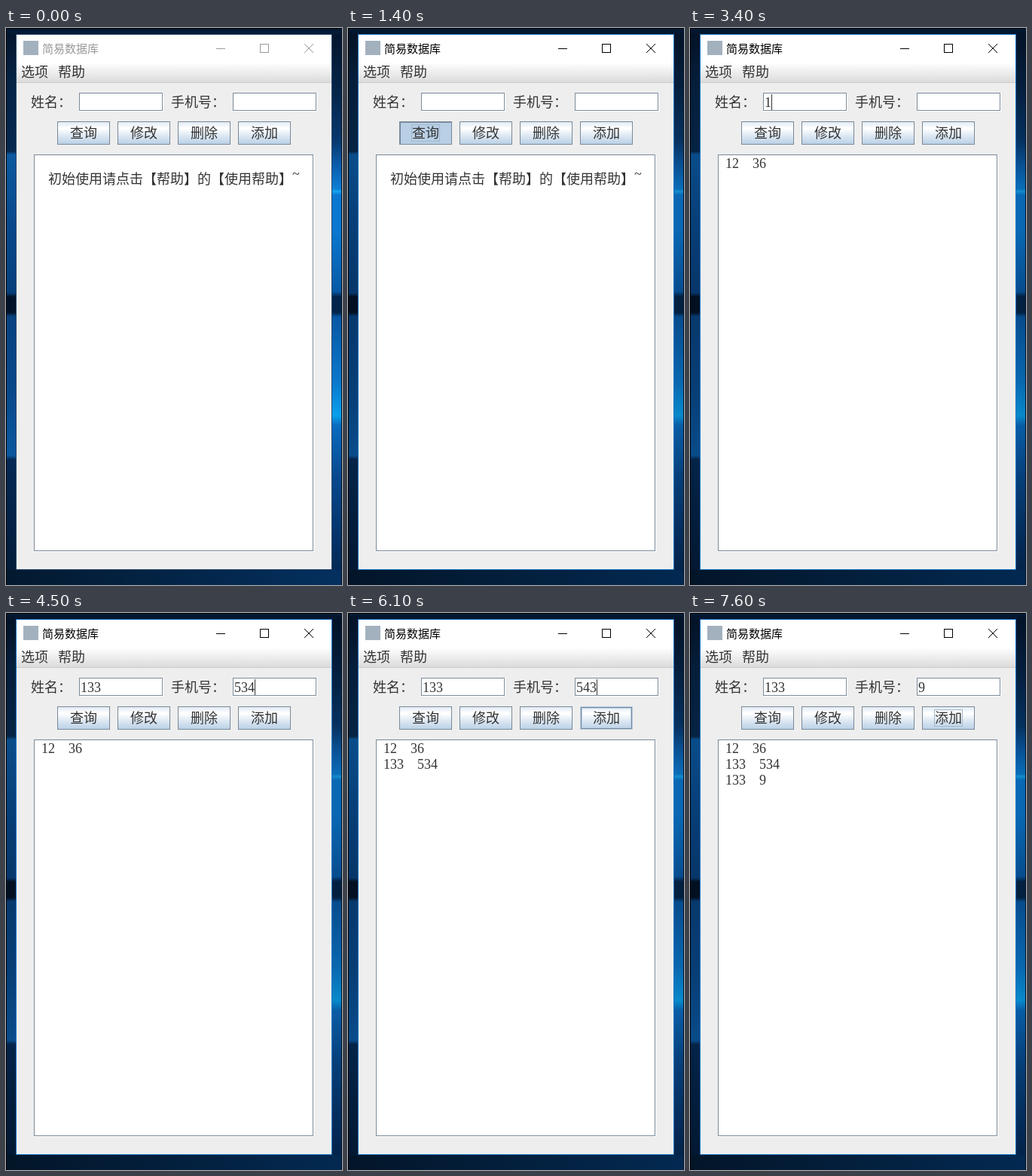
These frames come from a looping animation (446x740 px, 8 s). An HTML page with a canvas:

```html
<!DOCTYPE html>
<html lang="zh-CN">
<head>
<meta charset="utf-8">
<style>
html, body { margin: 0; width: 100%; height: 100%; overflow: hidden; background: #000; }
canvas { display: block; }
</style>
</head>
<body>
<canvas id="stage" width="446" height="740"></canvas>
<script>
const ctx = document.getElementById('stage').getContext('2d');
const LOOP = 8000, CELL = 9;
const CJK = '"Noto Sans CJK SC", "Noto Sans CJK", sans-serif';
const SERIF = '"Liberation Serif", serif';
const DARK = '#7a8a99', PALE = '#b8cfe5', INK = '#333';
const BUTTONS = { '查询': 68, '修改': 148, '删除': 228, '添加': 308 };
const FIELDS = { name: 97, phone: 301 };
const FIRST = '12    36', SECOND = '133    534', THIRD = '133    9';

// Each step changes only the listed parts of the window state.
const start = {
  active: false, minimize: 0, hot: '', pressed: '', focus: '',
  name: '', phone: '', field: '', caret: 0, selectFrom: null, rows: null
};
const steps = [
  [100, { minimize: 1 }],
  [200, { minimize: 0.45 }],
  [300, { minimize: 0 }],
  [1000, { active: true, field: 'name' }],
  [1300, { hot: '查询' }],
  [1400, { hot: '', pressed: '查询', focus: '查询', field: '' }],
  [2500, { pressed: '', rows: [FIRST] }],
  [2800, { focus: '', field: 'name' }],
  [3300, { field: '' }],
  [3400, { field: 'name', name: '1', caret: 1 }],
  [3900, { name: '13', caret: 2 }],
  [4000, { name: '133', caret: 3 }],
  [4200, { field: 'phone', caret: 0 }],
  [4500, { phone: '534', caret: 3 }],
  [4800, { hot: '添加' }],
  [4900, { hot: '', pressed: '添加' }],
  [5000, { focus: '添加', field: '' }],
  [5100, { pressed: '', hot: '添加', rows: [FIRST, SECOND] }],
  [5300, { hot: '' }],
  [5500, { focus: '', field: 'phone', caret: 1, selectFrom: 3 }],
  [5700, { phone: '54', caret: 2, selectFrom: null }],
  [5800, { phone: '543', caret: 3 }],
  [6100, { hot: '添加' }],
  [6300, { hot: '', field: '' }],
  [6400, { field: 'phone', caret: 2, selectFrom: 3 }],
  [6500, { caret: 1 }],
  [6600, { caret: 0 }],
  [7000, { phone: '9', caret: 1, selectFrom: null }],
  [7200, { hot: '添加' }],
  [7400, { hot: '', pressed: '添加', focus: '添加', field: '' }],
  [7500, { pressed: '', hot: '添加', rows: [FIRST, SECOND, THIRD] }],
  [7600, { hot: '' }]
];

function stateAt(time) {
  return Object.assign({}, start, ...steps.filter(([at]) => at <= time).map(([, change]) => change));
}

function fill(color, x, y, w, h) {
  ctx.fillStyle = color;
  ctx.fillRect(x, y, w, h);
}

function outline(color, x, y, w, h) {
  ctx.strokeStyle = color;
  ctx.lineWidth = 1;
  ctx.strokeRect(x + 0.5, y + 0.5, w - 1, h - 1);
}

function text(string, x, y, color = INK, size = 18, family = CJK) {
  ctx.font = `${family === CJK ? 300 : 400} ${size}px ${family}`;
  ctx.fillStyle = color;
  ctx.fillText(string, x, y);
}

function vertical(y, h, stops) {
  const gradient = ctx.createLinearGradient(0, y, 0, y + h);
  stops.forEach(([at, color]) => gradient.addColorStop(at / h, color));
  return gradient;
}

function sunken(x, y, w, h) {
  fill('#fff', x, y, w, h);
  outline(DARK, x, y, w - 1, h - 1);
}

function drawDesktop(active) {
  fill(vertical(0, 740, [
    [0, '#04142a'], [70, '#062344'], [164, '#06294f'], [168, '#0b59a0'], [260, '#08498b'],
    [352, '#073f7b'], [357, '#021327'], [378, '#021327'], [383, '#08427f'],
    [480, '#084889'], [568, '#0a58a0'], [573, '#052a55'], [740, '#031a36']
  ]), 0, 0, 223, 740);
  fill(vertical(0, 740, [
    [0, '#04142a'], [80, '#052448'], [150, '#07396f'], [180, '#0a5ba8'], [214, '#0c7fd6'],
    [217, '#16a5ee'], [222, '#0a78d0'], [270, '#0a78d0'], [350, '#0859a6'], [357, '#03254b'],
    [378, '#03254b'], [384, '#0858a4'], [470, '#0a78cc'], [515, '#08a0ec'],
    [528, '#0a6cc0'], [600, '#07488c'], [680, '#053268'], [740, '#04254c']
  ]), 223, 0, 223, 740);
  const bottom = ctx.createLinearGradient(0, 0, 446, 0);
  bottom.addColorStop(0, '#03192f');
  bottom.addColorStop(1, '#04305f');
  fill(bottom, 0, 720, 446, 20);
  fill('#041a35', 0, 0, 446, 8);
  if (active) fill('rgba(0,0,0,.14)', 1, 4, 444, 736);
  fill('#000', 0, 0, 1, 740);
  fill('#000', 0, 0, 446, 1);
  fill('#03142a', 445, 0, 1, 740);
}

function drawTitleBar({ active, minimize }) {
  const color = active ? '#000' : '#999';
  fill('#fff', 14, 9, 418, 37);
  if (minimize) fill(`rgba(229,229,229,${minimize})`, 256, 9, 58, 36);
  fill('#a3b1bf', 23, 17, 20, 19);
  text('简易数据库', 48, 33, color, 15);
  fill(color, 279, 27, 12, 1);
  outline(color, 337, 21, 12, 12);
  ctx.beginPath();
  ctx.moveTo(396, 21);
  ctx.lineTo(408, 33);
  ctx.moveTo(408, 21);
  ctx.lineTo(396, 33);
  ctx.stroke();
}

function drawButton(label, x, { hot, pressed, focus }) {
  const y = 124, w = 70, h = 31;
  if (pressed === label) {
    fill(PALE, x, y, w, h);
    outline(DARK, x, y, w, h);
    fill(DARK, x, y, w, 2);
    fill(DARK, x, y, 2, h);
  } else {
    fill(vertical(y, h, [[0, '#dde8f3'], [9, '#fff'], [10, '#fff'], [19, '#dde8f3'], [31, PALE]]), x, y, w, h);
    if (hot === label) {
      outline(PALE, x, y, w, h);
      outline(DARK, x + 1, y + 1, w - 2, h - 2);
      outline(PALE, x + 2, y + 2, w - 4, h - 4);
    } else {
      outline(DARK, x, y, w, h);
    }
  }
  if (focus === label) outline('#a3b8cc', x + 16, y + 4, 38, 23);
  text(label, x + 17, 146);
}

function drawField(key, x, state) {
  sunken(x, 86, 112, 25);
  const left = x + 2, caretX = left + state.caret * CELL;
  const focused = state.field === key;
  if (focused && state.selectFrom !== null) {
    fill(PALE, caretX, 88, (state.selectFrom - state.caret) * CELL, 21);
  }
  text(state[key], left, 105, INK, 18, SERIF);
  if (focused) fill(INK, caretX, 88, 1, 21);
}

function drawRows(rows) {
  sunken(37, 168, 372, 528);
  if (rows) {
    rows.forEach((row, i) => text(row, 47, 186 + 21 * i, INK, 18, SERIF));
  } else {
    text('初始使用请点击【帮助】的【使用帮助】', 56, 207);
    text('~', 380, 200, INK, 18, SERIF);
  }
}

function draw(state) {
  drawDesktop(state.active);
  fill(state.active ? '#1273c4' : '#22466c', 13, 8, 420, 712);
  fill('#eee', 14, 9, 418, 710);
  drawTitleBar(state);
  fill(vertical(46, 27, [[0, '#fff'], [27, '#dadada']]), 14, 46, 418, 27);
  fill('#ccc', 14, 72, 418, 1);
  text('选项', 20, 65);
  text('帮助', 69, 65);
  text('姓名：', 33, 105);
  text('手机号：', 219, 105);
  for (const key in FIELDS) drawField(key, FIELDS[key], state);
  for (const label in BUTTONS) drawButton(label, BUTTONS[label], state);
  drawRows(state.rows);
}

const began = performance.now();
function tick() {
  draw(stateAt((performance.now() - began) % LOOP));
  requestAnimationFrame(tick);
}
tick();
</script>
</body>
</html>
```
